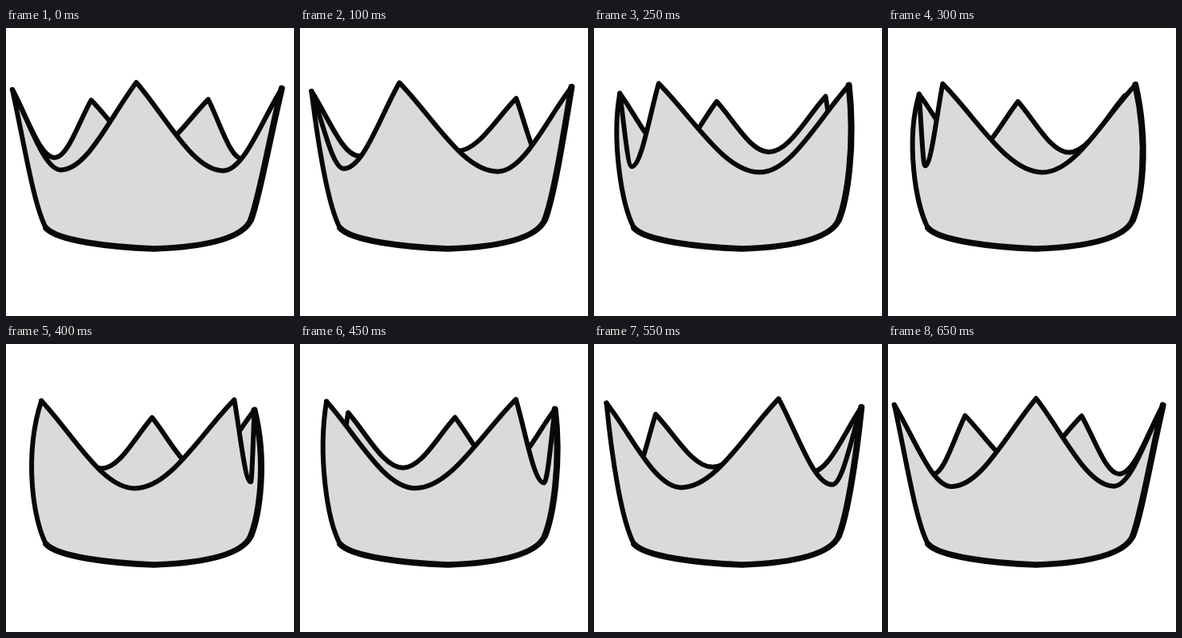
Recreate the animation shown at these times as an HTML page with a canvas. Size 360 by 360 pixels, loop 700 ms.

```html
<!DOCTYPE html>
<html lang="en">
<head>
<meta charset="utf-8">
<title>Turning crown</title>
<style>
html, body { margin: 0; width: 100%; height: 100%; overflow: hidden; background: #fff; }
canvas { display: block; width: 360px; height: 360px; }
</style>
</head>
<body>
<canvas id="stage" width="360" height="360"></canvas>
<script>
const ctx = document.getElementById('stage').getContext('2d');
const LOOP = 700, STEP = 50, TEETH = 5, TURN = 2 * Math.PI;
const GREY = '#dadada', INK = '#080808';
const LEFT_FOOT = [50, 250], BOTTOM = [185, 276], RIGHT_FOOT = [306, 240];

// A point of the rim, seen in perspective; angle 0 is nearest and grows to the left.
// One loop turns the crown by one tooth, slightly late in the middle of the loop.
function rimPoint(time, slot, isTooth) {
  const swing = Math.cos(TURN * time / LOOP);
  const lag = 17 * (1 - swing);
  const angle = TURN * ((time + 35 - lag) / LOOP + slot) / TEETH;
  const near = Math.cos(angle);
  const radius = 154 * (1 + 0.03 * swing) * (isTooth ? 1 : 0.84 - 0.06 * near);
  const x = 175 + 3 * near - radius * Math.sin(angle) / (1 - 0.34 * near);
  return [x, isTooth ? 80 - 12 * near : 167 + 13.5 * near];
}

// A flank leaves the tooth straight and runs level into the valley.
function flank(tooth, valley) {
  const dx = valley[0] - tooth[0], dy = valley[1] - tooth[1];
  return [
    tooth,
    [tooth[0] + 0.35 * dx, tooth[1] + 0.4 * dy],
    [valley[0] - 0.35 * dx, valley[1]],
    valley
  ];
}

// Curves along the rim from one tooth to another; direction is 1 behind, -1 in front.
function rim(time, from, to, direction) {
  const curves = [];
  for (let slot = from; slot !== to;) {
    const next = (slot + direction + TEETH) % TEETH;
    const valley = rimPoint(time, slot + direction / 2, false);
    curves.push(flank(rimPoint(time, slot, true), valley));
    curves.push(flank(rimPoint(time, next, true), valley).reverse());
    slot = next;
  }
  return curves;
}

function trace(curves) {
  ctx.beginPath();
  ctx.moveTo(...curves[0][0]);
  for (const [, c1, c2, end] of curves) ctx.bezierCurveTo(...c1, ...c2, ...end);
}

function fill(curves) {
  trace(curves);
  ctx.fillStyle = GREY;
  ctx.fill();
}

function ink(curves, width) {
  trace(curves);
  ctx.strokeStyle = INK;
  ctx.lineWidth = width;
  ctx.lineCap = ctx.lineJoin = 'round';
  ctx.stroke();
}

function draw(time) {
  const teeth = Array.from({ length: TEETH }, (_, slot) => rimPoint(time, slot, true));
  const xs = teeth.map(tooth => tooth[0]);
  const first = xs.indexOf(Math.min(...xs)), last = xs.indexOf(Math.max(...xs));

  const back = rim(time, first, last, 1);
  const front = rim(time, first, last, -1);
  const right = [[teeth[last], [327, 150], [316, 215], RIGHT_FOOT]];
  const base = [
    [RIGHT_FOOT, [294, 266], [240, 274], BOTTOM],
    [BOTTOM, [130, 274], [64, 266], LEFT_FOOT]
  ];
  const left = [[LEFT_FOOT, [34, 220], [22, 140], teeth[first]]];
  const body = [...right, ...base, ...left];

  ctx.fillStyle = '#fff';
  ctx.fillRect(0, 0, 360, 360);
  fill([...back, ...body]);
  ink(back, 6);
  fill([...front, ...body]);
  ink(front, 6);
  ink(left, 6);
  ink(base, 7.5);
  ink(right, 8);
}

const origin = performance.now();
function tick() {
  const time = (performance.now() - origin) % LOOP;
  draw(Math.floor(time / STEP) * STEP);
  requestAnimationFrame(tick);
}
tick();
</script>
</body>
</html>
```
